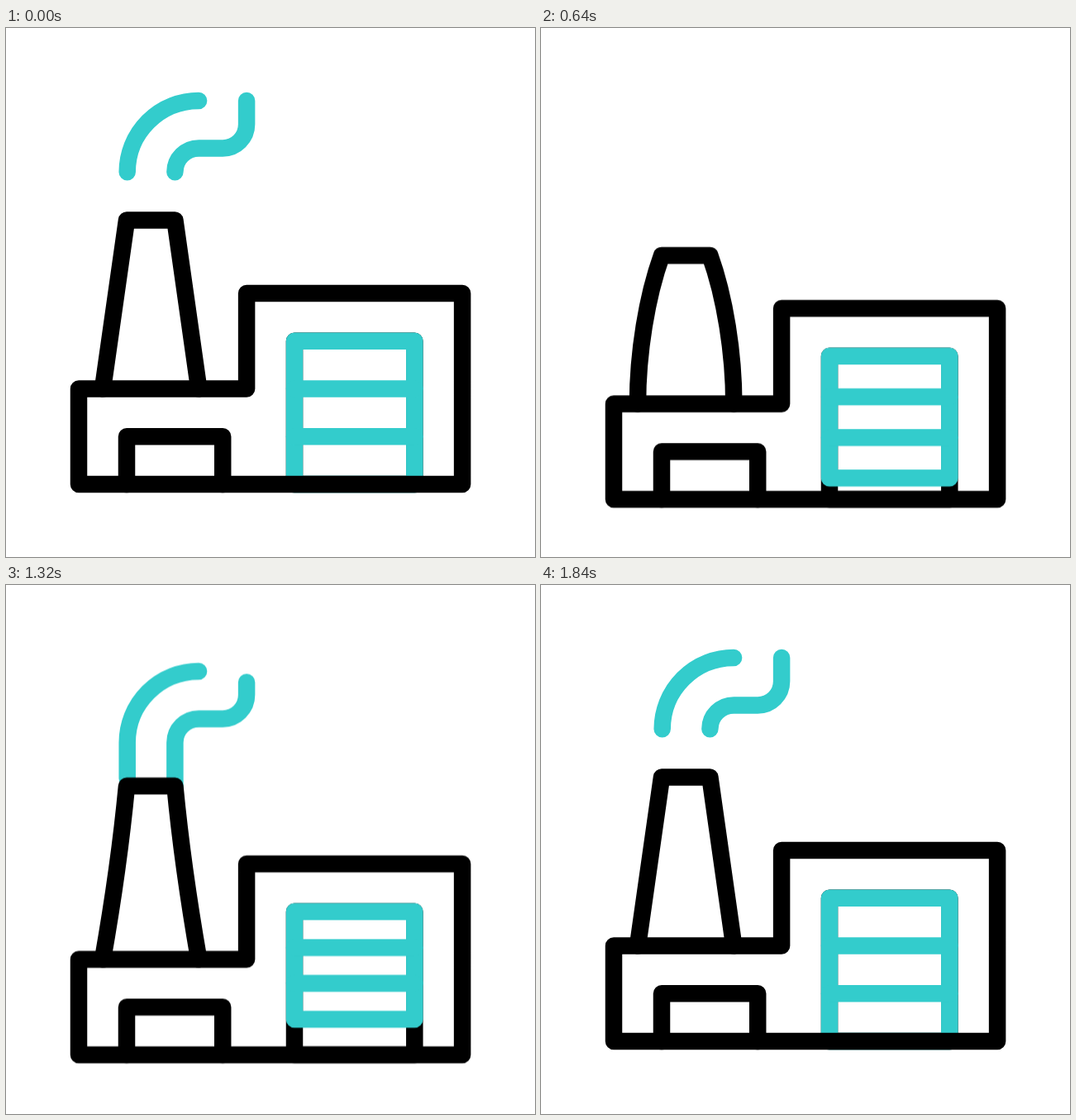
Write an HTML page without scripts that moves like this. It is 640x640 px and loops after 2000 ms.

```html
<!DOCTYPE html>
<html lang="en">
<head>
<meta charset="utf-8">
<title>Factory</title>
<style>
  /* smoke: tail and head positions along the path; door: shutter height */
  @property --tail { syntax: "<number>"; inherits: true; initial-value: 81.7; }
  @property --head { syntax: "<number>"; inherits: true; initial-value: 230; }
  @property --door { syntax: "<number>"; inherits: true; initial-value: 173.3; }

  html, body { margin: 0; width: 100%; height: 100%; overflow: hidden; background: #fff; }
  svg { display: block; width: 100vw; height: 100vh; }
  path, rect, line {
    fill: none; stroke: #000; stroke-width: 20.5;
    stroke-linecap: round; stroke-linejoin: round;
  }
  .teal, .teal * { stroke: #33cccc; }

  .plant { animation: bob 2s linear infinite; }
  @keyframes bob {
    0%, 4% { transform: translateY(0); }
    8% { transform: translateY(.4px); }
    12% { transform: translateY(1.3px); }
    16% { transform: translateY(3.1px); }
    20% { transform: translateY(6.2px); }
    24% { transform: translateY(10px); }
    28% { transform: translateY(14.4px); }
    32% { transform: translateY(18.2px); }
    36% { transform: translateY(21.2px); }
    42% { transform: translateY(23.8px); }
    48% { transform: translateY(24.5px); }
    52% { transform: translateY(24.2px); }
    56% { transform: translateY(23.3px); }
    60% { transform: translateY(21.4px); }
    64% { transform: translateY(18.4px); }
    68% { transform: translateY(14.5px); }
    72% { transform: translateY(10px); }
    76% { transform: translateY(6px); }
    80% { transform: translateY(3.3px); }
    84% { transform: translateY(1.5px); }
    88% { transform: translateY(.5px); }
    92%, 100% { transform: translateY(0); }
  }

  .stack, .shutter, .smoke {
    animation: 2s cubic-bezier(.333, 0, .667, 1) infinite;
  }

  .stack { fill: #fff; animation-name: puff; }
  @keyframes puff {
    0%, 7%, 74%, 100% {
      d: path("M117 436.5C126.7 368.5 136.3 300.5 146 232.5H204.4C214.1 300.5 223.7 368.5 233.3 436.5");
    }
    28%, 42% {
      d: path("M117 436.5C117 375 128 307 146 257H204.4C222.4 307 233.3 375 233.3 436.5");
    }
    58% {
      d: path("M117 436.5C130 376 144 277 146 221H204.4C206.4 277 220.4 376 233.3 436.5");
    }
  }

  .shutter { animation-name: roll; }
  .shutter rect { height: calc(var(--door) * 1px); }
  .shutter .upper { transform: translateY(calc(var(--door) * 1px / 3)); }
  .shutter .lower { transform: translateY(calc(var(--door) * 2px / 3)); }
  @keyframes roll {
    0%, 18%, 90%, 100% { --door: 173.3; }
    50%, 51.7% { --door: 110.3; }
  }

  .smoke {
    stroke-dasharray: calc((var(--head) - var(--tail)) * 1px) 999px;
    stroke-dashoffset: calc(var(--tail) * -1px);
  }
  .left { animation-name: left-tail, left-head, show; }
  .right { animation-name: right-tail, right-head, show; }
  @keyframes left-tail {
    0%, 8%, 77%, 100% { --tail: 81.7; }
    28%, 29.9% { --tail: 217; }
    30%, 56% { --tail: 0; }
  }
  @keyframes left-head {
    0%, 29.9%, 66%, 100% { --head: 217.4; }
    30%, 46% { --head: 0; }
  }
  @keyframes right-tail {
    0%, 8%, 78.5%, 100% { --tail: 81.7; }
    28%, 29.9% { --tail: 229.6; }
    30%, 58% { --tail: 0; }
  }
  @keyframes right-head {
    0%, 29.9%, 69%, 100% { --head: 230; }
    30%, 49% { --head: 0; }
  }
  @keyframes show {
    0%, 29.8% { opacity: 1; }
    29.9%, 46% { opacity: 0; }
    46.1%, 100% { opacity: 1; }
  }
</style>
</head>
<body>
<svg viewBox="0 0 640 640">
  <g class="plant">
    <path class="teal smoke left" d="M146.7 256V174.3A86.4 86.4 0 0 1 233.1 87.9"/>
    <path class="teal smoke right" d="M204.4 256V174.3A28.9 28.9 0 0 1 233.3 145.4H262.2A28.9 28.9 0 0 0 291.1 116.5V87.9"/>
    <path class="stack" d="M117 436.5C126.7 368.5 136.3 300.5 146 232.5H204.4C214.1 300.5 223.7 368.5 233.3 436.5"/>

    <rect x="349" y="378.8" width="145.3" height="173.3"/>
    <g class="teal shutter">
      <rect x="349" y="378.8" width="145.3" height="173.3"/>
      <line class="upper" x1="349" x2="494.3" y1="378.8" y2="378.8"/>
      <line class="lower" x1="349" x2="494.3" y1="378.8" y2="378.8"/>
    </g>

    <path d="M146 552V494.3H262.2V552"/>
    <path d="M88 552H552.1V321H291.1V436.5H88Z"/>
  </g>
</svg>
</body>
</html>
```
